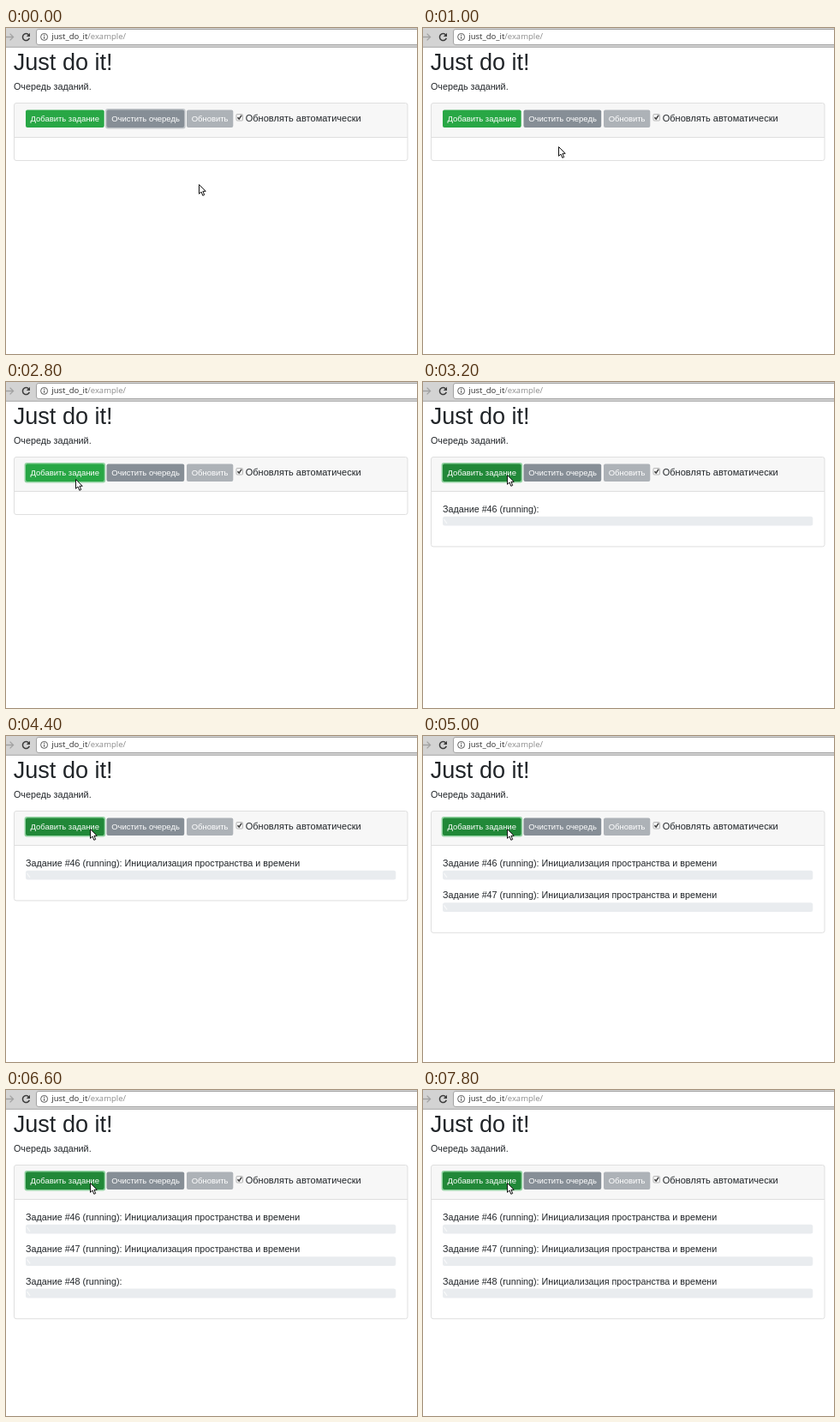
Write an HTML page that moves like this. It is 480 px wide and 380 px high and loops after 8 s.

```html
<!DOCTYPE html>
<html lang="ru">
<head>
<meta charset="utf-8">
<title>Очередь заданий</title>
<style>
  html, body { margin: 0; width: 100%; height: 100%; overflow: hidden; background: #fff; }
  svg { display: block; width: 480px; height: 380px; }
  text { font-family: "Liberation Sans", Arial, sans-serif; font-size: 10.75px; fill: #212529; white-space: pre; }
  .title { font-size: 27.1px; }
  .url { font-family: "Open Sans", "Noto Sans", sans-serif; font-size: 9.5px; fill: #303030; }
  .btn { font-size: 9.45px; fill: #fff; }
  .line { fill: none; stroke: #dfdfdf; stroke-width: 1; }
</style>
</head>
<body>
<svg viewBox="0 0 480 380">
  <!-- browser bar -->
  <rect width="480" height="22" fill="#d3d3d3"/>
  <rect y="21.8" width="480" height="1" fill="#a4a4a4"/>
  <path d="M482 1.5H38a2.5 2.5 0 0 0-2.5 2.5v13a2.5 2.5 0 0 0 2.5 2.5h444z" fill="#fff" stroke="#a3a3a3"/>
  <path d="M0 10.5h8M4.6 6.6l4 3.9-4 3.9" fill="none" stroke="#a2a2a2" stroke-width="1.3"/>
  <path d="M26.6 8.1a4 4 0 1 0 .7 3.6" fill="none" stroke="#3c3c3c" stroke-width="1.5"/>
  <path d="M28 5.7v4.2h-4.2z" fill="#3c3c3c"/>
  <circle cx="44.6" cy="10.4" r="4" fill="none" stroke="#5c5c5c"/>
  <path d="M44.6 9.7v3M44.6 7.8v1.1" stroke="#5c5c5c" stroke-width="1.1"/>
  <text class="url" x="53.3" y="13.4">just_do_it<tspan fill="#8a8a8a">/example/</tspan></text>

  <text class="title" x="8.7" y="48.5">Just do it!</text>
  <text x="9" y="72">Очередь заданий.</text>

  <!-- card -->
  <path d="M9.5 127.5V90a2.5 2.5 0 0 1 2.5-2.5h454.500a2.500 2.500 0 0 1 2.500 2.500v37.500z" fill="#f7f7f7"/>
  <path class="line" d="M9.500 127.500h459.500"/>
  <rect class="line" id="card" x="9.500" y="87.500" width="459.500" rx="2.500"/>

  <rect id="clearRing" x="116" y="94" width="93.700" height="23.500" rx="3" fill="#c2c6ca"/>
  <rect id="addRing" x="21.500" y="94" width="94.700" height="23.500" rx="3" fill="#93d3a2"/>
  <rect id="add" x="23" y="95.500" width="91.700" height="20.500" rx="2"/>
  <rect x="117.500" y="95.500" width="90.700" height="20.500" rx="2" fill="#868e96"/>
  <rect x="211" y="95.500" width="54.300" height="20.500" rx="2" fill="#adb2b7"/>
  <text class="btn" x="28.500" y="109">Добавить задание</text>
  <text class="btn" x="123.200" y="109">Очистить очередь</text>
  <text class="btn" x="216.700" y="109">Обновить</text>
  <rect x="269" y="100.500" width="7.500" height="7.500" rx="1" fill="#f4f4f4" stroke="#a6a6a6" stroke-width=".8"/>
  <path d="M270.500 104.200l1.700 1.900 3-4.500" fill="none" stroke="#3b3b3b" stroke-width="1.500"/>
  <text x="279.700" y="109" style="font-size:11.050px">Обновлять автоматически</text>

  <g id="tasks"></g>
  <path id="cursor" d="M.500.500v10.800l2.500-2.300 1.800 4.300 1.900-.8-1.800-4.200h3.300z" fill="#fff" stroke="#111" stroke-width="1" stroke-linejoin="round"/>
</svg>
<script>
const LOOP = 8000, STEP = 200, ROW = 37.4;
const $ = id => document.getElementById(id);

// [time, x, y]
const path = [
  [0, 225, 182], [800, 207, 168], [1000, 158, 138], [1200, 92, 112], [1400, 56, 103],
  [1600, 49, 101], [2400, 64, 110], [2600, 77, 118], [2800, 81, 113], [3000, 93, 109], [3200, 98, 108]
];
// [time, colour of the add button]
const shades = [
  [0, '#28a745'], [1200, '#218838'], [1800, '#1e7e34'], [2000, '#218838'], [2600, '#28a745'],
  [3000, '#218838'], [3400, '#1e7e34'], [3600, '#218838'], [5200, '#1e7e34'], [5400, '#218838']
];
// id, time the row appears, time its message appears
const jobs = [[46, 3200, 4200], [47, 5000, 5000], [48, 6000, 6800]];
const message = ' Инициализация пространства и времени';

$('tasks').innerHTML = jobs.map(([id], i) => `
  <g transform="translate(23 ${i * ROW})">
    <text y="152">Задание #${id} (running):<tspan>${message}</tspan></text>
    <rect y="156.800" width="432.300" height="10.800" rx="2.500" fill="#e9ecef"/>
    <path d="M1.500 160l3.500 5" stroke="#fff" stroke-width="1.200" opacity=".7"/>
  </g>`).join('');
const rows = [...$('tasks').children];

const at = (table, t) => table.filter(row => row[0] <= t).pop();
const show = (el, on) => el.style.display = on ? '' : 'none';

function draw(time) {
  const t = Math.floor(time % LOOP / STEP) * STEP;
  const [, x, y] = at(path, t);
  $('cursor').setAttribute('transform', `translate(${x} ${y})`);
  $('add').setAttribute('fill', at(shades, t)[1]);
  show($('clearRing'), t < 200);
  show($('addRing'), t >= 1800);
  $('addRing').style.opacity = t < 2000 ? .5 : 1;

  let count = 0;
  jobs.forEach(([, start, ready], i) => {
    show(rows[i], t >= start);
    show(rows[i].querySelector('tspan'), t >= ready);
    if (t >= start) count++;
  });
  $('card').setAttribute('height', 67 + count * ROW);
}

const origin = performance.now();
function tick() {
  draw(performance.now() - origin);
  requestAnimationFrame(tick);
}
draw(0);
requestAnimationFrame(tick);
</script>
</body>
</html>
```
